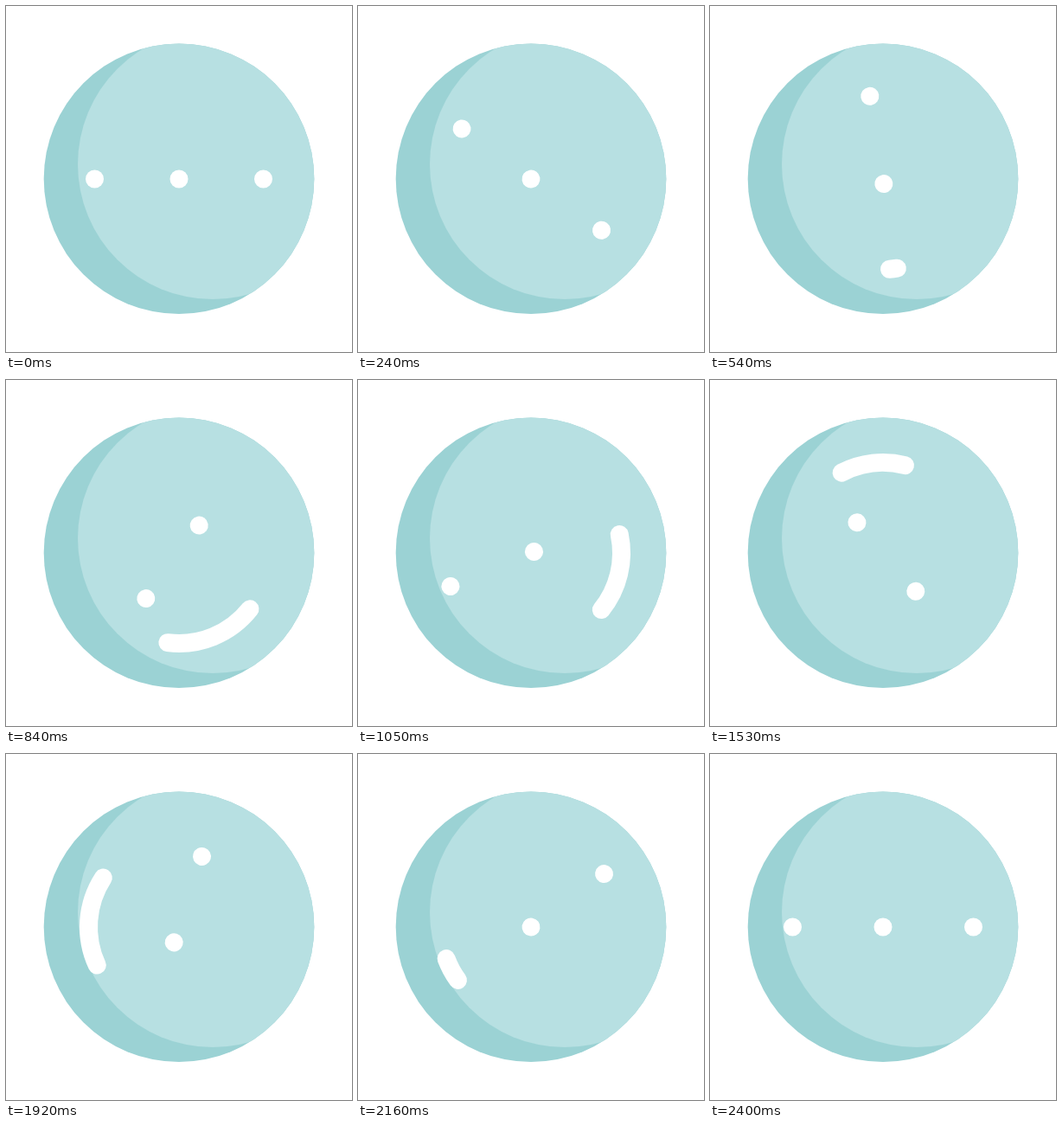
An HTML page with a canvas for the animation above (2460 ms loop, 400 by 400 pixels).

```html
<!DOCTYPE html>
<html lang="en">
<head>
<meta charset="utf-8">
<title>Rolling face</title>
<style>
  html, body { margin: 0; width: 100%; height: 100%; overflow: hidden; background: #fff; }
  canvas { display: block; width: 400px; height: 400px; }
</style>
</head>
<body>
<canvas id="stage" width="400" height="400"></canvas>
<script>
const ctx = document.getElementById('stage').getContext('2d');
const LOOP = 2460, TURN = 2400, STEP = 30;
const TAU = Math.PI * 2, DEG = Math.PI / 180;
const DOT = 10.5;

// Eased step from 0 to 1, beginning at start and lasting dur.
function ramp(t, start, dur) {
  const x = Math.min(Math.max((t - start) / dur, 0), 1);
  return (1 - Math.cos(Math.PI * x)) / 2;
}

// Distance between neighbouring dots, which opens up early in the loop.
const spread = (t, dur) => 97.5 + 7 * ramp(t, 0, dur);

// The eyes slide along the turning axis: there, back and there again.
const slide = t => ramp(t, 435, 700) - ramp(t, 1125, 700) + ramp(t, 1415, 700);

// Both mouth ends make three half turns; the tail leans back before it follows.
const mouthHead = t =>
  -180 * (ramp(t, 545, 600) + ramp(t, 1035, 600) + ramp(t, 1525, 600));
const mouthTail = t => 5 * ramp(t, 470, 80)
  - 185 * ramp(t, 660, 640) - 180 * (ramp(t, 1115, 660) + ramp(t, 1625, 660));

function disc(x, y, r, color) {
  ctx.fillStyle = color;
  ctx.beginPath();
  ctx.arc(x, y, r, 0, TAU);
  ctx.fill();
}

function drawBall() {
  ctx.save();
  disc(200, 199.8, 156.3, '#9bd2d4');
  ctx.clip();
  disc(239, 183, 156, '#b7e0e2');
  ctx.restore();
}

function drawFace(t) {
  const gap = spread(t, 840), shift = slide(t);
  ctx.save();
  ctx.translate(200, 200);
  ctx.rotate(t / TURN * TAU);
  disc(gap * (shift - 1), 0, DOT, '#fff');
  disc(gap * shift, 0, DOT, '#fff');
  ctx.strokeStyle = '#fff';
  ctx.lineWidth = DOT * 2;
  ctx.lineCap = 'round';
  ctx.beginPath();
  ctx.arc(0, 0, spread(t, 500), mouthHead(t) * DEG, mouthTail(t) * DEG + 0.001);
  ctx.stroke();
  ctx.restore();
}

function render(elapsed) {
  const t = Math.min(Math.floor(elapsed % LOOP / STEP) * STEP, TURN);
  ctx.clearRect(0, 0, 400, 400);
  drawBall();
  drawFace(t);
}

const start = performance.now();
function tick() {
  render(performance.now() - start);
  requestAnimationFrame(tick);
}
tick();
</script>
</body>
</html>
```
